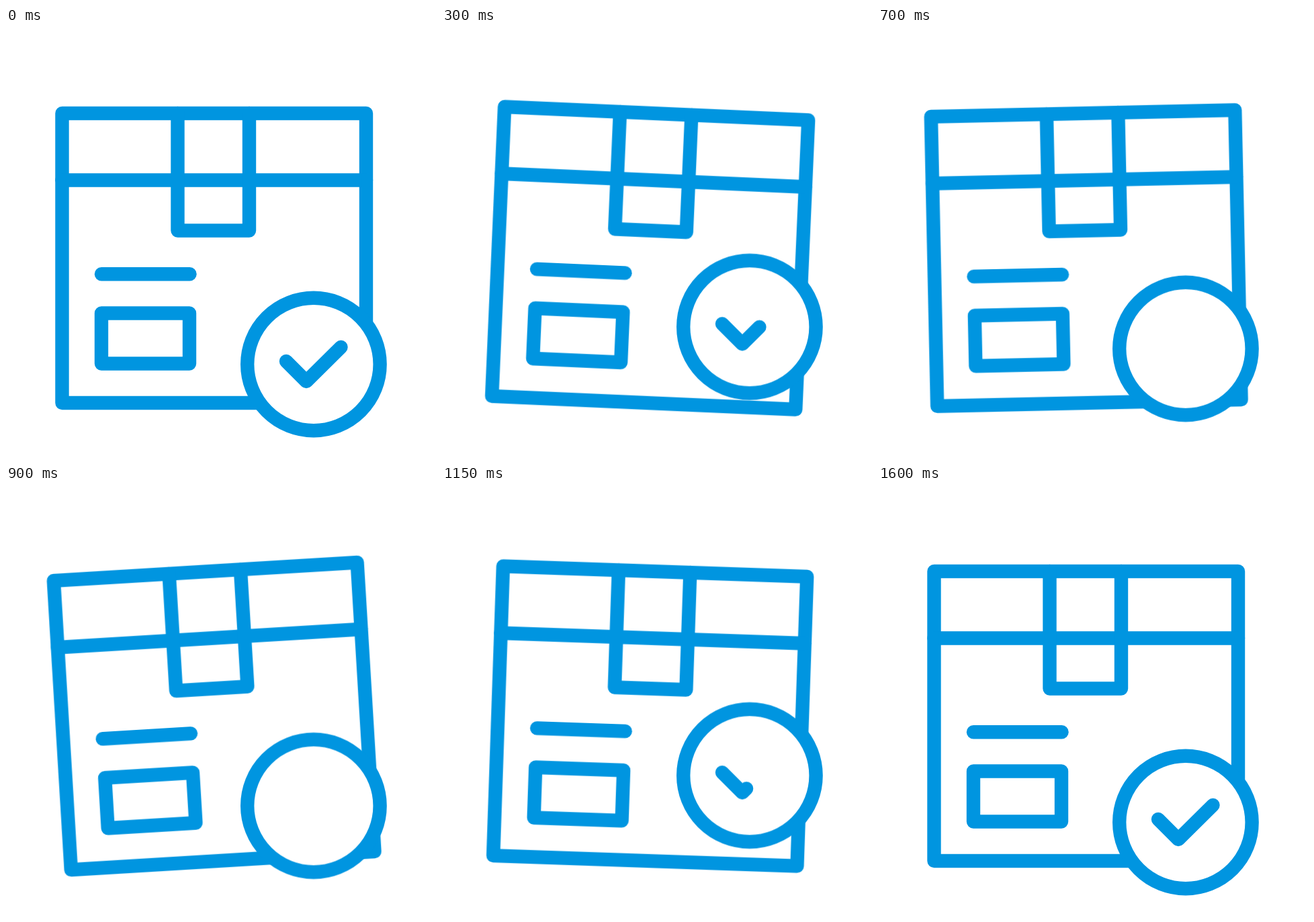
Recreate the animation shown at these times as an HTML page. Size 640 by 640 pixels, loop 1.65 s.

```html
<!DOCTYPE html>
<html lang="en">
<head>
<meta charset="utf-8">
<title>Parcel check</title>
<style>
  html, body {
    margin: 0;
    width: 100%;
    height: 100%;
    overflow: hidden;
    background: #fff;
  }

  svg {
    display: block;
    width: 100vw;
    height: 100vh;
    fill: none;
    stroke: #0095e0;
    stroke-width: 20.4;
    stroke-linecap: round;
    stroke-linejoin: round;
  }

  .box, .badge, .tick {
    --ease: cubic-bezier(.333, 0, .667, 1);
    animation: 1650ms var(--ease) infinite;
  }

  .box {
    transform-box: view-box;
    transform-origin: 309.75px 342.5px;
    animation-name: wobble;
  }

  .badge { animation-name: bob; }
  .disc { fill: #fff; }

  .tick {
    stroke-dasharray: 100 200;
    animation-name: draw, blank;
    animation-timing-function: var(--ease), step-end;
  }

  @keyframes wobble {
    0%, 4.06% { transform: rotate(0deg); }
    32.3% { transform: rotate(5deg); }
    49.1% { transform: rotate(-4.5deg); }
    70.7% { transform: rotate(2deg); }
    86.85%, 100% { transform: rotate(0deg); }
  }

  @keyframes bob {
    0% { transform: translateY(0); }
    24.24% { transform: translateY(-65.8px); }
    48.48% { transform: translateY(-15.5px); }
    72.73% { transform: translateY(-72px); }
    96.97%, 100% { transform: translateY(0); }
  }

  @keyframes draw {
    0%, 4.24% { stroke-dashoffset: 0; }
    41.4% { stroke-dashoffset: 100; }
    54.55% {
      stroke-dashoffset: 100;
      animation-timing-function: cubic-bezier(.28, 0, .6, 1);
    }
    90.91%, 100% { stroke-dashoffset: 0; }
  }

  /* An empty dash would still show its round cap. */
  @keyframes blank {
    0% { opacity: 1; }
    41.4% { opacity: 0; }
    54.7%, 100% { opacity: 1; }
  }
</style>
</head>
<body>
<svg viewBox="0 0 640 640">
  <g class="box">
    <rect x="83.5" y="127" width="452.5" height="431"/>
    <path d="M83.5 226.5H536"/>
    <path d="M255.5 127V301.5H362V127"/>
    <path d="M142 366.3H273.5"/>
    <rect x="142" y="424.5" width="131" height="75"/>
  </g>
  <g class="badge">
    <circle class="disc" cx="457.9" cy="500.5" r="98.7"/>
    <path class="tick" pathLength="100" d="M417 496L447 526L498.5 475"/>
  </g>
</svg>
</body>
</html>
```
